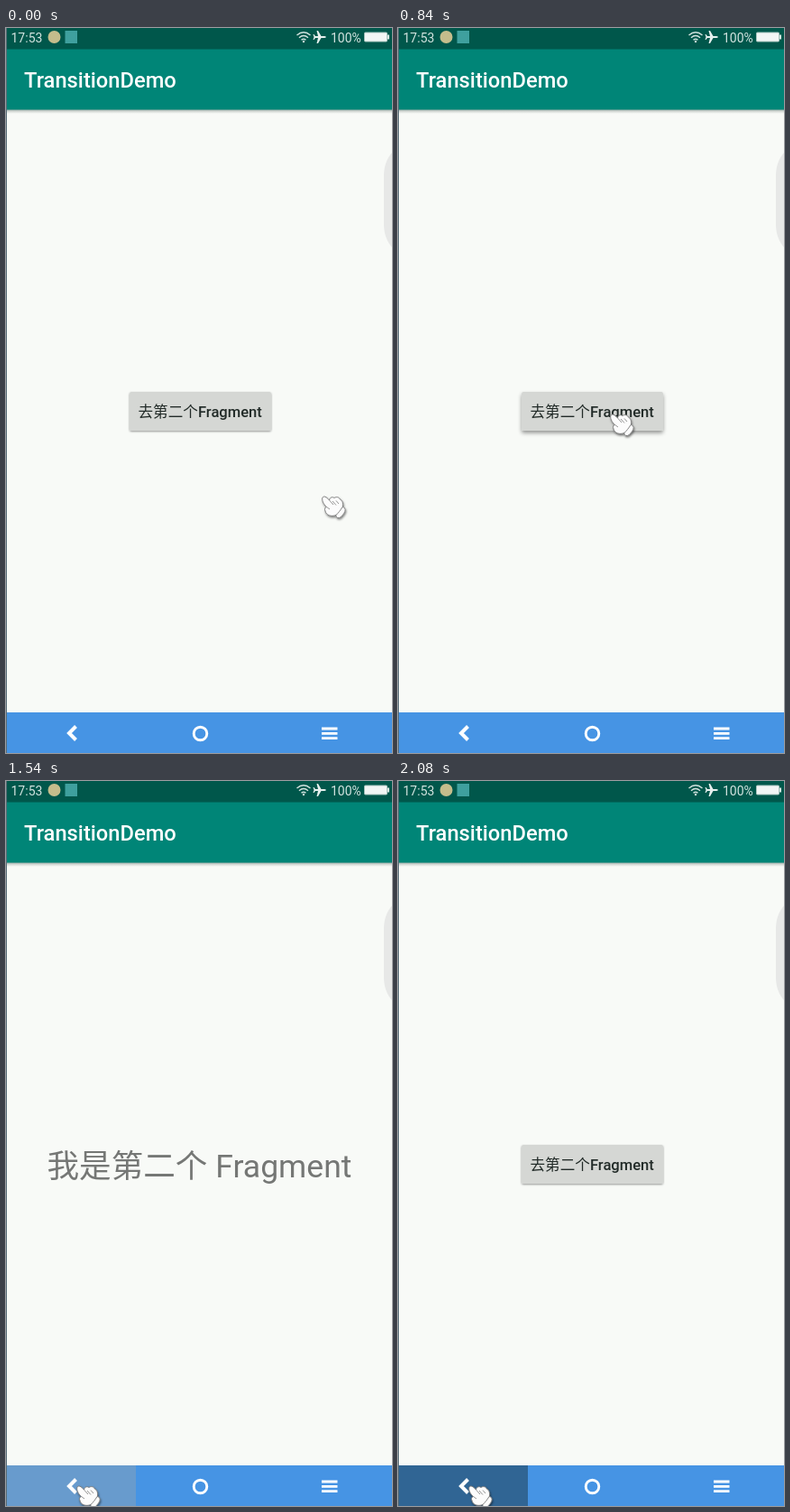
Animation, 428 px wide and 803 px high, one loop 2870 ms. Source, as an HTML page:

```html
<!DOCTYPE html>
<html lang="zh-CN">
<head>
<meta charset="utf-8">
<title>Fragment transition</title>
<style>
  html, body { margin: 0; width: 100%; height: 100%; overflow: hidden; background: #f8faf7; }
  svg { display: block; width: 100vw; height: 100vh; }
  text { font-family: Roboto, "Noto Sans CJK SC", "Noto Sans CJK", sans-serif; white-space: pre; }
  .medium { font-weight: 500; }
  .status { font-size: 14px; fill: #d3e3df; }
  .line { fill: none; stroke: #fff; }
</style>
</head>
<body>
<svg viewBox="0 0 428 803" lang="zh-CN">
  <defs>
    <linearGradient id="barShade" x2="0" y2="1">
      <stop stop-color="#5f706b" stop-opacity=".6"/>
      <stop offset="1" stop-color="#a0aaa6" stop-opacity="0"/>
    </linearGradient>
    <filter id="buttonShade" x="-10%" y="-20%" width="120%" height="150%">
      <feDropShadow id="drop" dx="0" dy="1" stdDeviation="1" flood-color="#000" flood-opacity=".4"/>
    </filter>
    <filter id="handShade" x="-20%" y="-20%" width="150%" height="150%">
      <feDropShadow dx=".8" dy="1.6" stdDeviation=".8" flood-color="#000" flood-opacity=".5"/>
    </filter>
  </defs>

  <rect width="428" height="803" fill="#f8faf7"/>

  <g id="home">
    <rect x="137" y="403" width="157" height="43" rx="2" fill="#d5d7d4" filter="url(#buttonShade)"/>
    <text x="146.5" y="431" font-size="16.6" fill="#222b28">去第二个<tspan class="medium">Fragment</tspan></text>
  </g>
  <text id="detail" x="45.5" y="438.5" font-size="35.6" fill="#757775">我是第二个 Fragment</text>

  <path d="M428 138C422 145 419 154 419 163V218C419 227 422 236 428 243Z" fill="#e7e8e7"/>

  <rect y="90" width="428" height="5" fill="url(#barShade)"/>
  <rect y="23" width="428" height="67.5" fill="#008577"/>
  <rect width="428" height="23.5" fill="#00574b"/>
  <text class="medium" x="20" y="66" font-size="23.7" fill="#fff">TransitionDemo</text>

  <text class="status" x="5.5" y="15.5">17:53</text>
  <circle cx="53.5" cy="10" r="7" fill="#c5bd8c"/>
  <rect x="65.500" y="3" width="13.500" height="14" fill="#3fa09e"/>
  <g class="line" style="stroke:#d3e3df" stroke-width="1.4">
    <path d="M322.500 8Q330 1.500 337.500 8M325 10.700Q330 6.200 335 10.700M327.500 13.300Q330 11 332.500 13.300"/>
  </g>
  <circle cx="330" cy="15" r="1.200" fill="#d3e3df"/>
  <path d="M355 10Q354.500 9 353 9H349.500L346 3H344.500L346 9H343L341.500 7H340.500L341.500 10L340.500 13H341.500L343 11H346L344.500 17H346L349.500 11H353Q354.500 11 355 10Z" fill="#e6f0ee"/>
  <text class="status" x="360" y="15.5">100%</text>
  <rect x="397.500" y="5" width="25" height="10" rx="1" fill="#f2f6f5" stroke="#a9c4be"/>
  <rect x="423" y="7.500" width="2" height="5" fill="#d3e3df"/>

  <rect y="758" width="428" height="45" fill="#4694e4"/>
  <rect id="backKey" x="1" y="758" width="143" height="45" fill="#84a1bc"/>
  <path class="line" d="M77.500 773.500L70 781L77.500 788.500" stroke-width="4"/>
  <circle class="line" cx="215.500" cy="781.500" r="7.300" stroke-width="2.900"/>
  <path class="line" d="M350 776H367.500M350 781.300H367.500M350 786.600H367.500" stroke-width="2.800"/>

  <rect width="1" height="803" fill="#586d78"/>

  <g id="hand">
    <g filter="url(#handShade)" stroke="#777" stroke-width=".9" stroke-linejoin="round">
      <path fill="#fcfcfc" d="M1 2C2.500 0 5 1 8.500 5C9 1.800 12 .8 14 2.600C16 .8 19.500 1.500 20.300 4C23 5 24 8 23.500 12C23.500 15 20 20 16 21.500C11 23.500 5 22 4 17C3 15 3.500 13 5.500 12.500C1.500 9 0 4.500 1 2Z"/>
      <path fill="#fcfcfc" d="M23 12.500C25.500 12.500 26.800 15 25.800 17.500C24.500 20.500 22 23.500 19.500 24.500C17 25 15.500 23.500 16 21.500C18.500 19 21 16 23 12.500Z"/>
    </g>
    <path d="M8.500 5L13 10M12 6L16 10.500M16 5.500L19 9M5.500 12.500L9 15" fill="none" stroke="#888" stroke-width=".9"/>
  </g>
</svg>
<script>
  const LOOP = 2870;
  const $ = id => document.getElementById(id);
  const [home, detail, backKey, hand, drop] =
    ["home", "detail", "backKey", "hand", "drop"].map($);

  const progress = (t, from, to) => Math.min(1, Math.max(0, (t - from) / (to - from)));
  const mix = (a, b, u) => a + (b - a) * u;
  const easeOut = u => 1 - (1 - u) ** 2;
  const smooth = u => u * u * (3 - 2 * u);
  const rollIn = u => smooth(u) - 0.65 * u * u * (1 - u);
  const linear = u => u;

  // Time, fingertip x and y, easing used to arrive there.
  const route = [
    [260, 350, 518],
    [490, 239, 434, smooth],
    [740, 235, 427, easeOut],
    [960, 235, 427, linear],
    [1020, 235, 429, smooth],
    [1320, 126, 693, rollIn],
    [1350, 116, 711, linear],
    [1530, 78, 780, easeOut]
  ];

  function handAt(t) {
    const i = route.findIndex(stop => t < stop[0]);
    if (i <= 0) return (i ? route[route.length - 1] : route[0]).slice(1, 3);
    const [t0, x0, y0] = route[i - 1];
    const [t1, x1, y1, ease] = route[i];
    const u = ease(progress(t, t0, t1));
    return [mix(x0, x1, u), mix(y0, y1, u)];
  }

  function draw(t) {
    const shown = progress(t, 850, 1000) * (1 - progress(t, 1810, 2060));
    home.setAttribute("opacity", 1 - shown);
    detail.setAttribute("opacity", shown);

    const lift = progress(t, 790, 835) * (1 - progress(t, 1000, 1010));
    drop.setAttribute("dy", mix(1, 2.6, lift));
    drop.setAttribute("stdDeviation", mix(1, 2, lift));

    const released = t >= 1830;
    backKey.setAttribute("fill", released ? "#306594" : "#84a1bc");
    backKey.setAttribute("opacity", progress(t, 1510, 1565));

    hand.setAttribute("transform", `translate(${handAt(t)})`);
  }

  const start = performance.now();
  function tick() {
    draw((performance.now() - start) % LOOP);
    requestAnimationFrame(tick);
  }
  tick();
</script>
</body>
</html>
```
